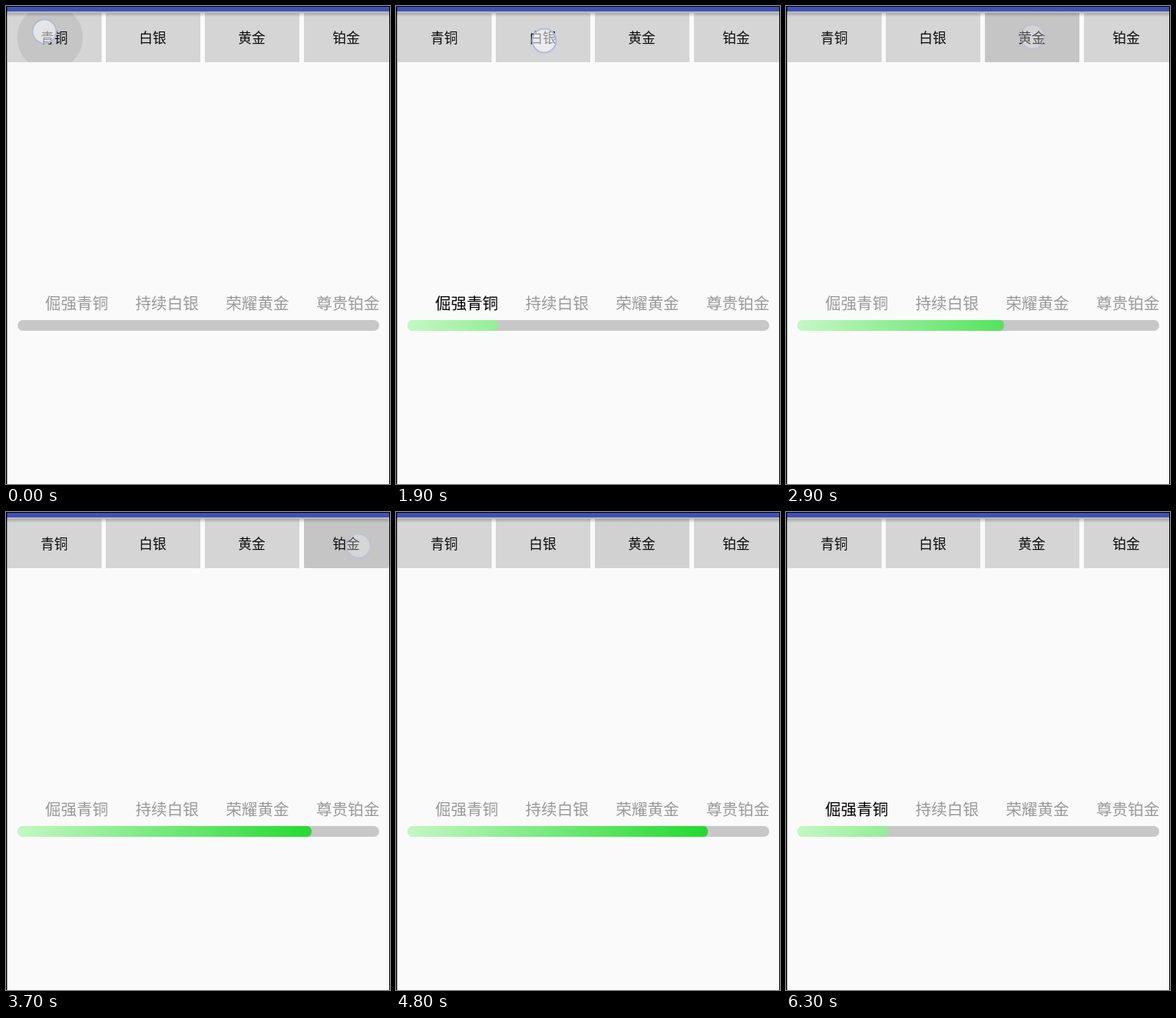
Recreate the animation shown at these times as an HTML page with a canvas. Size 500 by 621 pixels, loop 8.1 s.

```html
<!DOCTYPE html>
<html lang="zh-CN">
<head>
<meta charset="utf-8">
<style>
html, body { margin: 0; width: 100%; height: 100%; overflow: hidden; background: #fafafa; }
canvas { display: block; }
</style>
</head>
<body>
<canvas id="stage" width="500" height="621"></canvas>
<script>
const ctx = document.getElementById('stage').getContext('2d');
const LOOP = 8100, STEP = 100, SLIDE = 400, SETTLED = 370;
const FONT = '"Noto Sans CJK SC", "Noto Sans CJK", sans-serif';

const buttons = [
  { text: '青铜', x: 2, w: 122.5 },
  { text: '白银', x: 130, w: 123 },
  { text: '黄金', x: 259, w: 123 },
  { text: '铂金', x: 388, w: 111 }
];
const labels = ['倔强青铜', '持续白银', '荣耀黄金', '尊贵铂金'];

// press: finger down, go: finger up and bar starts, x/y: finger position
const taps = [
  { press: -100, go: 1200, from: 0, to: 1, x: 50, y: 33 },
  { press: 1900, go: 1990, from: 1, to: 2, x: 193, y: 45 },
  { press: 2700, go: 2788, from: 2, to: 3, x: 321, y: 40 },
  { press: 3600, go: 3600, from: 3, to: 4, x: 459, y: 44 },
  { press: 4500, go: 4528, from: 4, to: 3, x: 320, y: 36 },
  { press: 5200, go: 5195, from: 3, to: 2, x: 192, y: 34 },
  { press: 5800, go: 5890, from: 2, to: 1, x: 50, y: 36 }
];

const clamp = v => Math.max(0, Math.min(1, v));

function rect(x, y, w, h, fill) {
  ctx.fillStyle = fill;
  ctx.fillRect(x, y, w, h);
}

function pill(w, radii, fill) {
  ctx.fillStyle = fill;
  ctx.beginPath();
  ctx.roundRect(15, 408, w, 14, radii);
  ctx.fill();
}

function write(text, x, y, font, fill) {
  ctx.font = font + ' ' + FONT;
  ctx.fillStyle = fill;
  ctx.fillText(text, x, y);
}

function gradient(x0, y0, x1, y1, from, to) {
  const g = ctx.createLinearGradient(x0, y0, x1, y1);
  g.addColorStop(0, from);
  g.addColorStop(1, to);
  return g;
}

const green = gradient(15, 0, 486, 0, '#c4f7c4', '#00d40f');
const shade = gradient(0, 7, 0, 14, 'rgba(0,0,0,.3)', 'rgba(0,0,0,0)');

function drawRipple(tap, since) {
  const b = buttons[tap.to - 1];
  const grow = clamp(since / 110);
  const cx = b.x + b.w / 2 - 6 * (1 - grow);
  const reach = Math.hypot(b.w / 2, 32);
  ctx.save();
  ctx.beginPath();
  ctx.rect(b.x, 9, b.w, 64);
  ctx.clip();
  ctx.globalAlpha = clamp((330 - since) / 220);
  ctx.fillStyle = 'rgba(0,0,0,.075)';
  ctx.beginPath();
  ctx.arc(cx, 41, reach * (0.62 + 0.39 * grow), 0, 7);
  ctx.fill();
  ctx.restore();
}

function drawFinger(tap, since) {
  ctx.globalAlpha = clamp(1 - since / 220);
  ctx.fillStyle = 'rgba(255,255,255,.55)';
  ctx.strokeStyle = '#b3b9dc';
  ctx.lineWidth = 2;
  ctx.beginPath();
  ctx.arc(tap.x, tap.y, 15.5, 0, 7);
  ctx.fill();
  ctx.stroke();
  ctx.globalAlpha = 1;
}

function draw(t) {
  const tap = taps.findLast(p => p.press <= t);
  const since = t - tap.go;
  const progress = since >= SETTLED ? 1 : clamp(since / SLIDE);
  const level = tap.from + (tap.to - tap.from) * progress;

  rect(0, 0, 500, 621, '#fafafa');
  ctx.textAlign = 'center';
  for (const b of buttons) rect(b.x, 9, b.w, 64, '#d5d5d5');
  if (t > tap.press) drawRipple(tap, since);
  rect(0, 7, 500, 7, shade);
  rect(0, 0, 500, 7, '#3f51b5');
  for (const b of buttons) write(b.text, b.x + b.w / 2 - 0.5, 47.5, '500 17.7px', '#0c0c0c');
  drawFinger(tap, since);

  labels.forEach((text, i) =>
    write(text, 92 + 117.7 * i, 394, '20.6px', level === i + 1 ? '#000' : '#999'));
  pill(471, 7, '#c8c8c8');
  if (level > 0) pill(1 + 117.5 * level, [7, 6, 6, 7], green);

  rect(0, 0, 500, 1, '#000');
  rect(0, 0, 1.4, 621, '#000');
  rect(499, 0, 1, 621, '#000');
}

const start = performance.now();
function tick() {
  const t = (performance.now() - start) % LOOP;
  draw(Math.floor(t / STEP) * STEP);
  requestAnimationFrame(tick);
}
tick();
</script>
</body>
</html>
```
